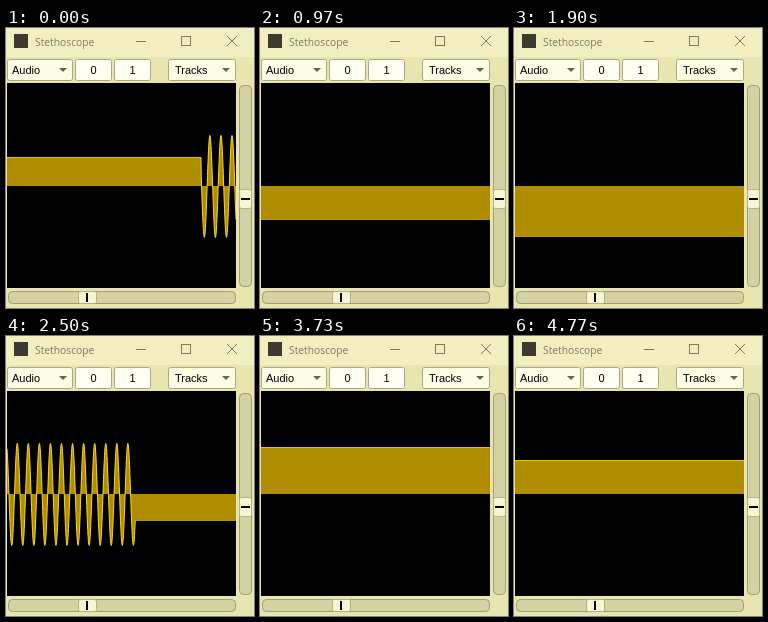
Write an HTML page with a canvas that moves like this. It is 248 by 280 pixels and loops after 4810 ms.

```html
<!DOCTYPE html>
<html lang="en">
<head>
<meta charset="utf-8">
<title>Stethoscope</title>
<style>
  html, body { margin: 0; width: 100%; height: 100%; overflow: hidden; background: #eeecc0; }
  canvas { display: block; width: 248px; height: 280px; }
</style>
</head>
<body>
<canvas id="stage" width="248" height="280"></canvas>
<script>
const ctx = document.getElementById('stage').getContext('2d');
const LOOP = 4810;

// Oscilloscope view
const VIEW = { x: 1, y: 55, w: 229, h: 205 };
const ZERO = 158, AMP = 51;

// The scope refreshes one buffer at a time (milliseconds).
const BUFFER = 84.9, LEAD = 51;

// A sine passes while the gate is open; its last value is held after closing.
const WAVE = 4.1, OPEN = 51.4, FIRST_LEVEL = 29;
const gates = [
  [38.8, -5], [560, -33], [1078, -49], [1555, -50], [2033, -43],
  [2510, -26], [3012.7, 13], [3513, 47], [4013, 49], [4513, 34]
].map(([close, level]) => ({ close, level, phase: Math.asin(level / AMP) }));

function signal(time) {
  let held = FIRST_LEVEL;
  for (const { close, level, phase } of gates) {
    if (time < close - OPEN) break;
    if (time < close) return AMP * Math.sin(phase + 2 * Math.PI * (time - close) / WAVE);
    held = level;
  }
  return held;
}

function box(x, y, w, h, r, fill, stroke) {
  ctx.beginPath();
  ctx.roundRect(x + 0.5, y + 0.5, w - 1, h - 1, r);
  ctx.fillStyle = fill;
  ctx.fill();
  ctx.strokeStyle = stroke;
  ctx.lineWidth = 1;
  ctx.stroke();
}

function text(str, x, y, font, color, align = 'left') {
  ctx.font = font;
  ctx.fillStyle = color;
  ctx.textAlign = align;
  ctx.fillText(str, x, y);
}

function line(color, ...points) {
  ctx.beginPath();
  for (let i = 0; i < points.length; i += 4) {
    ctx.moveTo(points[i], points[i + 1]);
    ctx.lineTo(points[i + 2], points[i + 3]);
  }
  ctx.strokeStyle = color;
  ctx.lineWidth = 1;
  ctx.stroke();
}

const UI_FONT = '11px "Liberation Sans", Arial, sans-serif';

function menu(x, w, label, textX) {
  box(x, 31, w, 22, 2, '#fdfde6', '#aaa884');
  text(label, textX, 46, UI_FONT, '#000');
  const tip = x + w - 10;
  ctx.beginPath();
  ctx.moveTo(tip - 4, 40);
  ctx.lineTo(tip + 4, 40);
  ctx.lineTo(tip, 44);
  ctx.fillStyle = '#66644c';
  ctx.fill();
}

function field(x, w, value) {
  box(x, 31, w, 22, 2, '#fffff4', '#aaa884');
  text(value, x + w / 2, 46, UI_FONT, '#000', 'center');
}

function drawWindow() {
  ctx.fillStyle = '#f1efc0';
  ctx.fillRect(0, 0, 248, 29);
  ctx.fillStyle = '#e8e5b0';
  ctx.fillRect(0, 29, 248, 251);

  ctx.fillStyle = '#3c3a2e';
  ctx.fillRect(8, 6, 14, 14);
  text('Stethoscope', 29, 18, '10.3px "Open Sans", "Noto Sans", sans-serif', '#7c7a66');
  line('#7c7a66', 130, 13.5, 140, 13.5);
  ctx.strokeRect(175.5, 8.5, 9, 9);
  line('#7c7a66', 221, 8, 231, 18, 231, 8, 221, 18);

  menu(1, 66, 'Audio', 6);
  field(69, 37, '0');
  field(108, 37, '1');
  menu(162, 68, 'Tracks', 169);

  box(233, 57, 13, 202, 4, '#d4d1a2', '#a09d78');
  box(233, 161, 13, 20, 2, '#f8f6d0', '#b2b08c');
  box(2, 263, 228, 13, 4, '#d4d1a2', '#a09d78');
  box(72, 263, 19, 13, 2, '#f8f6d0', '#b2b08c');
  ctx.fillStyle = '#000';
  ctx.fillRect(235, 170, 9, 2);
  ctx.fillRect(80, 265, 2, 9);
}

function drawScope(t) {
  const end = Math.floor((t + LEAD) / BUFFER) * BUFFER;
  const { x, y, w, h } = VIEW;
  ctx.save();
  ctx.beginPath();
  ctx.rect(x, y, w, h);
  ctx.clip();
  ctx.fillStyle = '#000';
  ctx.fillRect(x, y, w, h);

  const trace = new Path2D();
  const area = new Path2D();
  area.moveTo(x, ZERO);
  for (let dx = 0; dx <= w; dx += 0.25) {
    const px = x + dx;
    const py = ZERO - signal(end - BUFFER + BUFFER * px / w);
    trace.lineTo(px, py + 0.5);
    area.lineTo(px, py);
  }
  area.lineTo(x + w, ZERO);
  ctx.fillStyle = '#b08c00';
  ctx.fill(area);
  ctx.strokeStyle = '#ffda20';
  ctx.lineWidth = 1;
  ctx.stroke(trace);
  ctx.restore();
}

function frame() {
  drawWindow();
  drawScope(performance.now() % LOOP);
  requestAnimationFrame(frame);
}
frame();
</script>
</body>
</html>
```
